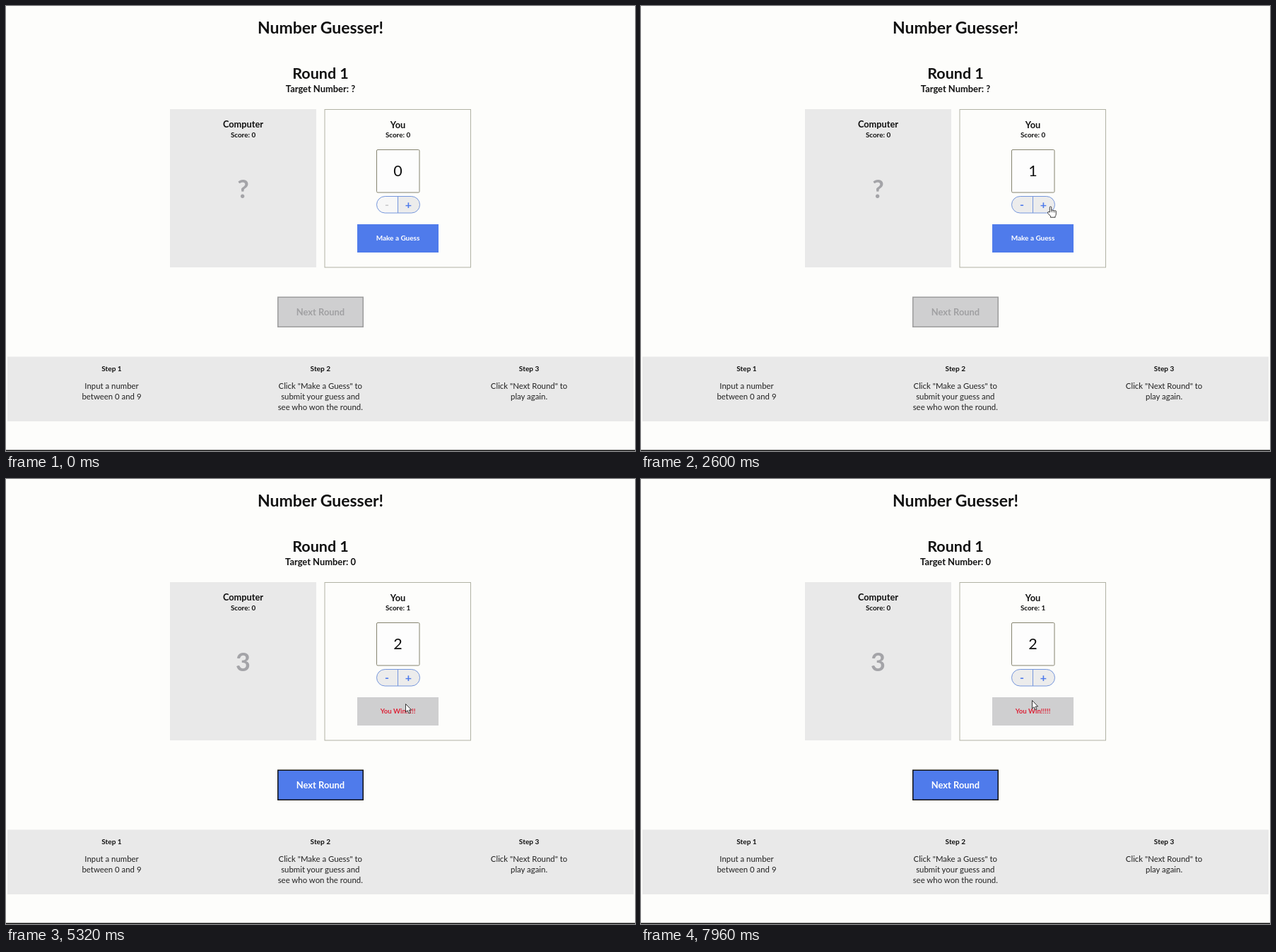
These frames come from a looping animation (890x630 px, 8000 ms). An HTML page:

```html
<!DOCTYPE html>
<html lang="en">
<head>
<meta charset="utf-8">
<title>Number Guesser</title>
<style>
  html, body { margin: 0; width: 100%; height: 100%; overflow: hidden; background: #fdfdfb; }
  svg { display: block; }
  text { font-family: Lato, "Open Sans", sans-serif; text-anchor: middle; fill: #111; }
  .bold { font-weight: 700; }
  .pointer { fill: #fff; stroke: #222; stroke-width: .9; stroke-linejoin: round; }
</style>
</head>
<body>
<svg id="stage" width="890" height="630" viewBox="0 0 890 630">
  <rect x="232" y="146" width="207" height="224" fill="#e9e9e9"/>
  <rect x="451" y="146.5" width="206.5" height="223.5" fill="none" stroke="#b1b2a4"/>
  <rect x="524.5" y="203.5" width="60.5" height="60.5" rx="1.5" fill="#fdfdfd" stroke="#85836f"/>
  <path id="minusCell" d="M554.5 269.5H536.5a12 11.75 0 0 0 0 23.5H554.5z"/>
  <path d="M554.5 269.5H573.5a12 11.75 0 0 1 0 23.5H554.5z" fill="#ececec"/>
  <rect x="524.5" y="269.5" width="61" height="23.5" rx="11.75" fill="none" stroke="#7596dc"/>
  <path d="M554.5 269.5V293" stroke="#7596dc"/>
  <rect id="guessBox" x="497" y="309" width="115" height="40"/>
  <rect id="nextBox" x="384.75" y="412.25" width="120.5" height="42" stroke-width="1.5"/>
  <rect x="2" y="496.5" width="886" height="91.5" fill="#e9e9e9"/>
  <rect y="628.5" width="890" height="1.5" fill="#111"/>
  <g id="labels"></g>
  <g id="cursor" class="pointer">
    <path id="arrow" d="M0 0V11.5L2.7 9.2L4.6 13.4L6.5 12.6L4.7 8.5H8.2z"/>
    <g id="hand">
      <path d="M-1.2 8V1.2a1.2 1.2 0 0 1 2.4 0V5.6a1.2 1.2 0 0 1 2.3 .3a1.2 1.2 0 0 1 2.2 .5a1.1 1.1 0 0 1 2.1 .7V10.5Q7.8 12.5 6.6 13.5V15.2H0V13.5L-4 9.2Q-4.2 7.2 -2.6 7.3z"/>
      <path d="M1.2 5.8V8M3.5 6.2V8.2M5.7 6.8V8.5" fill="none" stroke-width=".7"/>
    </g>
  </g>
</svg>
<script>
const LOOP = 8000, STEP = 40;
const APPEAR = 840, HAND_ON = 1240, FIRST_CLICK = 2600, SECOND_CLICK = 3040, GUESS = 4800;
const BLUE = '#4f7beb', GREY = '#cfcfd0';
const $ = id => document.getElementById(id);

function label(str, x, y, size, bold = true, fill = '') {
  const el = document.createElementNS('http://www.w3.org/2000/svg', 'text');
  el.setAttribute('x', x);
  el.setAttribute('y', y);
  el.setAttribute('font-size', size);
  if (bold) el.setAttribute('class', 'bold');
  el.style.fill = fill;
  el.textContent = str;
  return $('labels').appendChild(el);
}

label('Number Guesser!', 445, 38.7, 23);
label('Round 1', 445, 102.5, 21.5);
label('Computer', 335.5, 171.8, 12.8);
label('Score: 0', 335.5, 185.5, 9.9);
label('You', 554.5, 172.5, 12.8);
label('+', 569.5, 287.3, 16, true, BLUE);
const target = label('', 445, 121.8, 12.9);
const computer = label('', 335.5, 272, 36, true, '#a4a4a8');
const score = label('', 554.5, 186.3, 9.9);
const number = label('', 554.5, 240.5, 21.5, false);
const minus = label('-', 539, 287.3, 16);
const guess = label('', 554.5, 332.4, 10);
const next = label('Next Round', 445, 437.8, 12.9);

[
  ['Input a number', 'between 0 and 9'],
  ['Click "Make a Guess" to', 'submit your guess and', 'see who won the round.'],
  ['Click "Next Round" to', 'play again.']
].forEach((lines, i) => {
  const x = 149.5 + i * 295.3;
  label('Step ' + (i + 1), x, 516.8, 10.1);
  lines.forEach((line, row) => label(line, x, 542 + row * 15, 11.4, false, '#222'));
});

// Pointer stops: time, x, y
const path = [
  [840, 531.5, 270.5], [1080, 531.5, 270.5], [1520, 579.5, 284], [3920, 579.5, 284],
  [4040, 575.5, 293], [4520, 565.5, 318.5], [5320, 565.5, 318.5], [5800, 500, 126],
  [6200, 439.5, 153.5], [6700, 352, 258], [7000, 355, 262], [7480, 546, 240],
  [7960, 553.5, 313.5]
];

function pointerAt(t) {
  const i = path.findIndex(stop => stop[0] >= t);
  if (i < 1) return path[i ? path.length - 1 : 0].slice(1);
  const [t0, x0, y0] = path[i - 1], [t1, x1, y1] = path[i];
  const u = (t - t0) / (t1 - t0), ease = u * u * (3 - 2 * u);
  return [x0 + (x1 - x0) * ease, y0 + (y1 - y0) * ease];
}

function draw(t) {
  const value = (t >= FIRST_CLICK) + (t >= SECOND_CLICK);
  const done = t >= GUESS;
  const [x, y] = pointerAt(t);

  number.textContent = value;
  target.textContent = 'Target Number: ' + (done ? 0 : '?');
  computer.textContent = done ? 3 : '?';
  score.textContent = 'Score: ' + (done ? 1 : 0);
  guess.textContent = done ? 'You Win!!!!!' : 'Make a Guess';
  guess.setAttribute('font-size', done ? 9.6 : 10);
  guess.style.fill = done ? '#dc2438' : '#fff';
  next.style.fill = done ? '#fff' : '#a0a0a2';
  minus.style.fill = value ? BLUE : '#c9c9cb';
  minus.style.opacity = t >= APPEAR && t < HAND_ON ? 0 : 1;

  $('minusCell').setAttribute('fill', value ? '#ececec' : '#f7f7f7');
  $('guessBox').setAttribute('fill', done ? GREY : BLUE);
  $('nextBox').setAttribute('fill', done ? BLUE : GREY);
  $('nextBox').setAttribute('stroke', done ? '#111' : '#9c9c9c');

  const hand = t >= HAND_ON && !done;
  $('cursor').style.display = t < APPEAR ? 'none' : '';
  $('cursor').setAttribute('transform', `translate(${x} ${y})`);
  $('hand').style.display = hand ? '' : 'none';
  $('arrow').style.display = hand ? 'none' : '';
}

function tick() {
  draw(Math.floor(performance.now() % LOOP / STEP) * STEP);
  requestAnimationFrame(tick);
}
tick();
</script>
</body>
</html>
```
